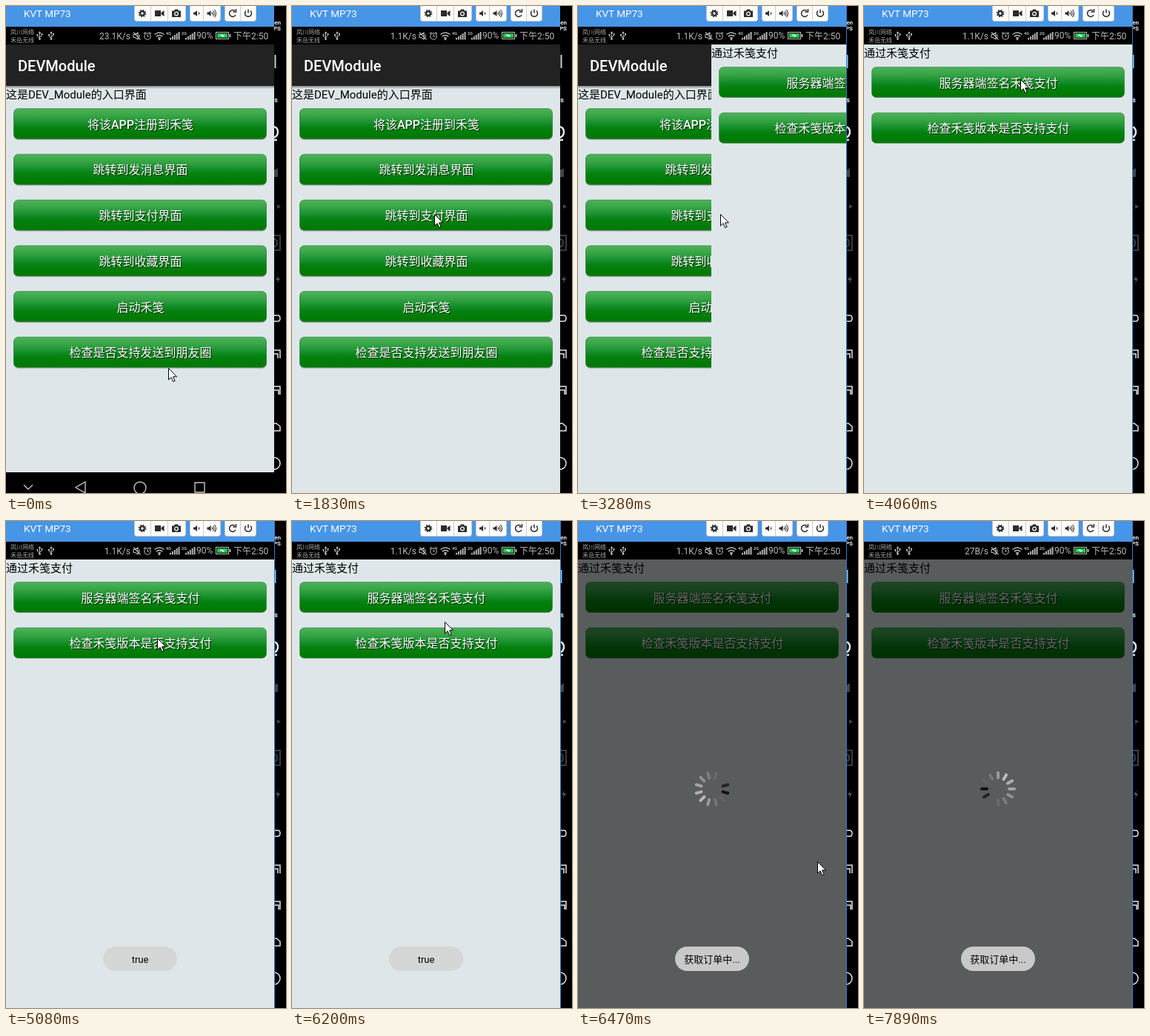
These frames come from a looping animation (378x658 px, 8000 ms). An HTML page:

```html
<!DOCTYPE html>
<html lang="zh-CN">
<head>
<meta charset="utf-8">
<style>
html, body { margin: 0; width: 100%; height: 100%; overflow: hidden; background: #000; }
svg { display: block; width: 378px; height: 658px; }
text { font-family: Roboto, "Noto Sans CJK SC", "Noto Sans CJK", "Noto Sans", sans-serif; white-space: pre; }
.label { font-size: 16px; fill: #fff; text-anchor: middle; text-shadow: 1px 1px 1px rgba(0, 0, 0, .75); }
#home .label { font-weight: 500; }
.status { font-size: 12px; fill: #b9b9b9; }
.line { fill: none; stroke: #b9b9b9; stroke-width: 1.1; }
.dark { fill: #2b2b2b; }
.pen { fill: none; stroke: #2b2b2b; stroke-width: 1.5; }
.side { fill: none; stroke: #e4e4e4; stroke-width: 1.5; }
</style>
</head>
<body>
<svg id="stage" viewBox="0 0 378 658">
  <defs>
    <linearGradient id="green" x2="0" y2="1">
      <stop offset="0" stop-color="#4cb259"/>
      <stop offset=".22" stop-color="#3aa648"/>
      <stop offset=".45" stop-color="#1b9231"/>
      <stop offset=".64" stop-color="#048110"/>
      <stop offset="1" stop-color="#007800"/>
    </linearGradient>
    <linearGradient id="shade" x2="0" y2="1">
      <stop offset="0" stop-color="#000" stop-opacity=".4"/>
      <stop offset="1" stop-color="#000" stop-opacity="0"/>
    </linearGradient>
    <clipPath id="phone"><path d="M0 0H362V658H0z"/></clipPath>
    <clipPath id="strip"><path d="M362 0H378V658H362z"/></clipPath>
  </defs>

  <g clip-path="url(#strip)">
    <path d="M362 0H378V658H362z"/>
    <g fill="#eee" font-weight="700" font-size="8" text-anchor="end">
      <text x="371" y="25">en</text><text x="371" y="33">PS</text>
      <text x="367" y="130" font-size="9">s</text>
    </g>
    <path id="sideBar" d="M363.500 66V84" stroke-width="2"/>
    <path class="side" d="M361 163q6 1 6 7t-6 8M362 181h4" style="stroke-width:2.500"/>
    <path d="M362 221h2l3-2v12h-5zM366 268l5 3-5 3z" fill="#444"/>
    <path d="M358 310h12v20h-12M362 315q4 0 4 5t-4 5" fill="none" stroke="#3c3c3c" stroke-width="2"/>
    <path d="M368 364l-4 6h3l-1 5 4-7h-3z" fill="#555"/>
    <path class="side" d="M362 418h5q3 0 3 4t-3 4h-5M362 465h8v11M362 470h5v6M362 514h8v11M362 519h6v6M362 564h3l5 4v6h-8"/>
    <circle class="side" cx="362" cy="618" r="8"/>
  </g>

  <g clip-path="url(#phone)">
    <path d="M0 52H362V658H0z" fill="#dee6e9"/>
    <g id="home"></g>
    <g id="pay"></g>
    <rect id="press" x="10.500" width="341" height="41" rx="6" opacity=".25"/>
    <path id="dim" d="M0 52H362V658H0z"/>
    <g id="spinner"></g>
    <g id="toast">
      <rect x="131" y="575" width="100" height="33" rx="16.500" fill="#d5d5d5" fill-opacity=".91"/>
      <text id="toastText" x="181" y="597" font-size="13" text-anchor="middle"></text>
    </g>
    <g id="nav">
      <path d="M0 630H362V658H0z"/>
      <path d="M24 647l6 6 6-6M107 643v15l-13-7.500zM255 644h13v13h-13z" fill="none" stroke="#c4c4c4" stroke-width="1.400"/>
      <circle cx="181" cy="651" r="8" fill="none" stroke="#c4c4c4" stroke-width="1.400"/>
    </g>

    <path d="M0 0H362V28H0z" fill="#4795e6"/>
    <text x="24" y="15" font-size="13.500" fill="#fff">KVT MP73</text>
    <g id="tools"></g>

    <path d="M0 28H362V52H0z"/>
    <g font-size="8" fill="#a5a5a5">
      <text x="6" y="38">岚川网络</text><text x="6" y="49">禾岳无线</text>
    </g>
    <g id="usb"></g>
    <text class="status" id="speed" x="168" y="45" text-anchor="end"></text>
    <path class="line" d="M172 38.500h2l4-2.500v9l-4-2.500h-2zM172 35.500l9.500 10M180 38.500v4"/>
    <circle class="line" cx="191" cy="41" r="4.200"/>
    <path class="line" d="M191 38.500v2.500h2M186 37.500l2.500-2M196 37.500l-2.500-2"/>
    <path class="line" style="stroke-width:1.500" d="M200.500 38.500q6.500-5 13 0M202.700 41.200q4.300-3.500 8.600 0M205 43.500q2-1.500 4 0"/>
    <circle cx="207" cy="45" r="1.300" fill="#b9b9b9"/>
    <g id="signal"></g>
    <text class="status" x="257" y="44">90%</text>
    <rect class="line" x="283.500" y="35.500" width="17" height="9"/>
    <path d="M285 37h14v6h-14z" fill="#1fc04a"/>
    <path d="M301.500 38h2v4h-2z" fill="#b9b9b9"/>
    <path d="M288 40l4-2v1.500h4l-4 2.500v-1.500z" fill="#fff"/>
    <text class="status" x="307" y="45">下午2:50</text>
  </g>

  <path id="focus" d="M362.500 0V658" stroke="#2b7fd3"/>
  <path id="cursor" d="M.5.5V16l3.600-3.300 2.600 5.800 2.400-1-2.500-5.700h4.900z" fill="#fff" stroke="#000"/>
</svg>

<script>
const $ = id => document.getElementById(id);
const set = (id, name, value) => $(id).setAttribute(name, value);
const show = (id, on) => set(id, 'visibility', on ? 'visible' : 'hidden');

const button = (y, label, raised) =>
  (raised ? `<rect x="10" y="${y + 1}" width="342" height="41" rx="6.500" opacity=".25"/>` : '') + `
  <rect x="10.500" y="${y - .5}" width="341" height="41" rx="6" fill="url(#green)" stroke="#1d6a2a" stroke-opacity=".6" stroke-width=".8"/>
  <text class="label" x="181.500" y="${y + 26.5}">${label}</text>`;
const buttons = (top, raised, labels) => labels.map((s, i) => button(top + i * 61.75, s, raised)).join('');
const caption = (y, s) => `<text x="0" y="${y}" font-size="15">${s}</text>`;

$('home').innerHTML = `
  <path d="M0 52H362V108H0z" fill="#222"/>
  <path d="M0 108H362V112H0z" fill="url(#shade)"/>
  <text x="16" y="88" font-size="20" font-weight="500" fill="#fff">DEVModule</text>` +
  caption(125, '这是DEV_Module的入口界面') +
  buttons(139, true, ['将该APP注册到禾笺', '跳转到发消息界面', '跳转到支付界面',
    '跳转到收藏界面', '启动禾笺', '检查是否支持发送到朋友圈']);

$('pay').innerHTML = '<path d="M0 52H362V658H0z" fill="#dee6e9"/>' +
  caption(69, '通过禾笺支付') +
  buttons(83, false, ['服务器端签名禾笺支付', '检查禾笺版本是否支持支付']);

const box = (x, w, splits) => `
  <rect x="${x}" y="-5" width="${w}" height="25.500" rx="3" fill="#fdfdfd" stroke="#c9c9c9"/>` +
  splits.map(s => `<path d="M${s} 0V20" stroke="#ccc"/>`).join('');
$('tools').innerHTML = box(173.5, 69, [195.5, 218.5]) + box(248.5, 41, [266.5]) + box(295.5, 42, [316.5]) + `
  <circle class="pen" cx="184" cy="10" r="2.800" style="stroke-width:2.200"/>
  <circle class="pen" cx="184" cy="10" r="4.600" stroke-dasharray="1.800 1.810"/>
  <path class="dark" d="M201 6h8v8h-8zM209.500 9l4-3v8l-4-3z"/>
  <path class="dark" d="M224 6.500h3l1-2h4l1 2h3v8.500h-12z"/>
  <circle cx="230" cy="10.500" r="2.400" fill="none" stroke="#fff" stroke-width="1.200"/>
  <path class="dark" d="M253 8.500h2l3-2.500v8l-3-2.500h-2zM271.500 8.500h2l3-2.500v8l-3-2.500h-2z"/>
  <path class="pen" style="stroke-width:1.100" d="M260 8.500q1.500 1.500 0 3M278 8.500q1.500 1.500 0 3M279.500 6.500q3 3.500 0 7M281.500 5q4 5 0 10"/>
  <path class="pen" d="M309 6.500a4.500 4.500 0 1 0 1 5.500M310.500 4v4h-4"/>
  <path class="pen" d="M324 6.500a4.500 4.500 0 1 0 6 0M327 4.500v5"/>`;

$('usb').innerHTML = [45.5, 61].map(x => `
  <g transform="translate(${x} 40)"><path class="line" style="stroke-width:1" d="M0 -4V4M-3 -1V1L0 3M3 -2V0L0 2"/>
  <path d="M0 -6l1.800 3h-3.600zM-4 -2h2v2h-2zM2 -3h2v2h-2z" fill="#b9b9b9"/>
  <circle cy="4.500" r="1.400" fill="#b9b9b9"/></g>`).join('');

$('signal').innerHTML = [[217, '4G'], [238, '2G']].map(([x, s]) => `
  <text x="${x - 1}" y="39" font-size="5.500" font-weight="700" fill="#b9b9b9">${s}</text>` +
  [0, 1, 2, 3, 4].map(i => `<rect x="${x + 4 + i * 2.9}" y="${43 - i * 2}" width="1.900" height="${2.5 + i * 2}" fill="#b9b9b9"/>`).join('')).join('');

const SPOKES = ['#111', '#626464', '#757777', '#999', '#bbb', '#b0b0b0',
  '#a4a4a4', '#909090', '#7c7c7c', '#686a6a', '#5a5d5e', '#222'];
$('spinner').innerHTML = SPOKES.map((c, i) =>
  `<path d="M15 0H22" stroke="${c}" stroke-width="4" stroke-linecap="round" transform="rotate(${15 + i * 30})"/>`).join('');

// Each row: start time, then the values held until the next row
const CURSOR = [
  [0, 219, 489], [830, 221, 488], [1110, 212, 470], [1254, 185, 420], [1398, 160, 352],
  [1542, 157, 300], [1686, 178, 273], [1830, 192, 281],
  [3400, 202, 289], [3530, 230, 288], [3660, 238, 240], [3790, 228, 185], [3920, 215, 130], [4060, 211, 99],
  [4180, 207, 60], [4310, 204, 42], [4440, 203, 80], [4570, 203, 125], [4700, 204, 158],
  [5510, 205, 150], [5640, 205, 125], [5770, 206, 103], [6200, 206, 136], [6320, 265, 300], [6470, 323, 460]];
const SPEED = [[0, '23.1K/s'], [830, '1.1K/s'], [7031, '27B/s']];
const NAV = [[0, 0], [150, 14], [300, 30]];
const PAGE = [[0, 362], [3280, 180], [3400, 0]];
const PRESS = [[0, 0], [2520, 262], [2820, 0], [4700, 144.25], [4950, 0], [5900, 82.5], [6060, 0]];
const DIM = [[0, 0], [6320, .35], [6470, .6]];
const TOAST = [[0, ''], [4950, 'true'], [6470, '获取订单中...']];
const SPIN = [0, 6320, 6470, ...Array.from({ length: 8 }, (_, i) => 6590 + i * 1030 / 7), 7770, 7890].map(t => [t, t]);

const at = (rows, t) => rows.findLast(r => r[0] <= t).slice(1);

function draw(t) {
  const [press] = at(PRESS, t), [toast] = at(TOAST, t), [spin] = at(SPIN, t);
  set('cursor', 'transform', `translate(${at(CURSOR, t)})`);
  show('cursor', t < 6590);
  $('speed').textContent = at(SPEED, t)[0];
  set('nav', 'transform', `translate(0 ${at(NAV, t)[0]})`);
  set('pay', 'transform', `translate(${at(PAGE, t)[0]} 0)`);
  set('press', 'y', press);
  show('press', press > 0);
  set('dim', 'opacity', at(DIM, t)[0]);
  set('spinner', 'transform', `translate(181 362) rotate(${(spin - 6470) * 525 / 1420})`);
  show('spinner', spin > 0);
  $('toastText').textContent = toast;
  show('toast', toast !== '');
  show('focus', t >= 2520);
  set('sideBar', 'stroke', t >= 2520 ? '#8cc8f4' : '#ccc');
}

const start = performance.now();
function tick() {
  draw((performance.now() - start) % 8000);
  requestAnimationFrame(tick);
}
tick();
</script>
</body>
</html>
```
